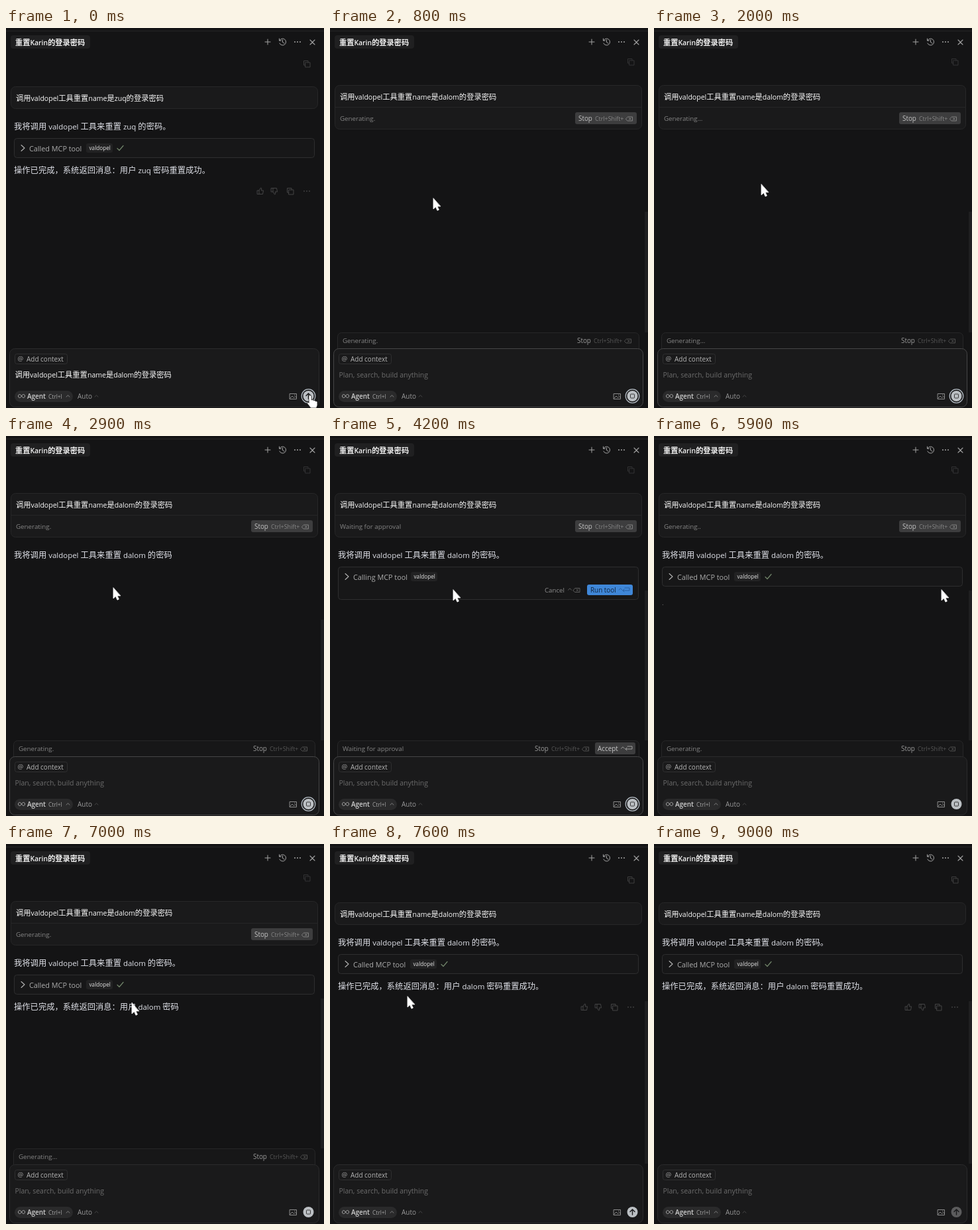
Write an HTML page with a canvas that moves like this. It is 480 by 573 pixels and loops after 9400 ms.

```html
<!DOCTYPE html>
<html lang="zh-CN">
<head>
<meta charset="utf-8">
<title>Agent chat</title>
<style>
html, body { margin: 0; width: 100%; height: 100%; overflow: hidden; background: #141415; }
canvas { display: block; }
</style>
</head>
<body>
<canvas id="stage" width="480" height="573"></canvas>
<script>
const ctx = document.getElementById('stage').getContext('2d');
const LOOP = 9400, SEND = 300, TOOL = 3500, RUN = 5000, DONE = 7300;
const LATIN = '"Open Sans", "Noto Sans", sans-serif';
const HAN = '"Noto Sans CJK SC", "Noto Sans CJK", sans-serif';
const TOOL_NAME = 'valdopel', OLD_USER = 'zuq', NEW_USER = 'dalom';

const command = user => `调用${TOOL_NAME}工具重置name是${user}的登录密码`;
const plan = user => `我将调用 ${TOOL_NAME} 工具来重置 ${user} 的密码。`;
const report = user => `操作已完成，系统返回消息：用户 ${user} 密码重置成功。`;

// Pointer path: time, x, y
const path = [
  [0, 457, 556], [300, 457, 556], [450, 405, 500], [700, 185, 285], [800, 156, 257],
  [1100, 156, 257], [1500, 158, 248], [1900, 162, 236], [2900, 162, 229], [3500, 164, 230],
  [4200, 186, 232], [4700, 405, 230], [5000, 425, 231], [5900, 434, 232], [6100, 420, 234],
  [7000, 190, 240], [7600, 117, 230], [8150, 120, 229], [8600, 262, 222], [9000, 225, 185]
];

function pointerAt(t) {
  const i = Math.max(1, path.findIndex(p => p[0] > t));
  const [t0, x0, y0] = path[i - 1], [t1, x1, y1] = path[i];
  let k = (t - t0) / (t1 - t0);
  k = k * k * (3 - 2 * k);
  return [x0 + (x1 - x0) * k, y0 + (y1 - y0) * k];
}

// Han and Latin runs share one nominal size; y is the middle of the line
function text(str, x, y, size, color, weight = 400) {
  ctx.fillStyle = color;
  for (const run of str.match(/[\u3000-\uffef]+|[^\u3000-\uffef]+/g) || []) {
    const han = run.charCodeAt(0) >= 0x3000;
    ctx.font = `${weight} ${han ? size : size * 0.933}px ${han ? HAN : LATIN}`;
    ctx.fillText(run, x, y + size * 0.36);
    x += ctx.measureText(run).width;
  }
}

function box(x, y, w, h, r, fill, stroke) {
  ctx.beginPath();
  ctx.roundRect(x, y, w, h, r);
  if (fill) { ctx.fillStyle = fill; ctx.fill(); }
  if (stroke) { ctx.strokeStyle = stroke; ctx.lineWidth = 1; ctx.stroke(); }
}

function disc(x, y, r, fill) {
  ctx.beginPath();
  ctx.arc(x, y, r, 0, 7);
  ctx.fillStyle = fill;
  ctx.fill();
}

// Strokes (and optionally fills) SVG path data placed at x, y
function icon(d, x, y, color, width = 1, fill) {
  const shape = new Path2D(d);
  ctx.save();
  ctx.translate(x, y);
  if (fill) { ctx.fillStyle = fill; ctx.fill(shape); }
  ctx.strokeStyle = color;
  ctx.lineWidth = width;
  ctx.lineJoin = ctx.lineCap = 'round';
  ctx.stroke(shape);
  ctx.restore();
}

const ICON = {
  plus: 'M-4 0H4M0-4V4',
  cross: 'M-3.5-3.5L3.5 3.5M3.5-3.5L-3.5 3.5',
  history: 'M-4.6-2A5 5 0 1 1-4.6 2M-5-5V-2H-2M0-3V.5L2.5 2',
  copy: 'M-2-2H5V5H-2ZM-2 2H-4.5V-4.5H2V-2',
  thumb: 'M-4.5-1H-2V4.5H-4.5ZM-2-1L.5-5Q2-5 1.7-3L1.3-1H4.5L3.5 4.5H-2',
  chevron: 'M-2.5-4.5L2.5 0L-2.5 4.5',
  check: 'M-4.5 .5L-1.5 3.5L4.5-3.5',
  up: 'M-2.5 1.2L0-1.2L2.5 1.2',
  erase: 'M-5 0L-2-3H5V3H-2ZM0-1.3L2.6 1.3M2.6-1.3L0 1.3',
  enter: 'M-2-3H5V1H-5M-3-1L-5 1L-3 3',
  infinity: 'M0 0C-1.5-3.5-5-3-5 0S-1.5 3.5 0 0S5-3 5 0S1.5 3.5 0 0',
  image: 'M-5-4H5V4H-5ZM-5 3L-1.5-.5L1 2L3 0L5 2M2-2H2.5',
  arrow: 'M0 4V-4M-3.5-.6L0-4L3.5-.6',
  pointer: 'M0 0V16L3.6 12.8L6 18.2L8.4 17.1L6 11.9H10.6Z',
  hand: 'M0 0C0-3 4-3 4 0V5C5 4 7 4 7.3 6C8.5 5 10 5.5 10.3 7C11.5 6.2 13 7 13 8.5V13L11.5 17H3L-2 10.5C-3 8.5-1 7.5 0 9Z'
};

function dots(x, y, color) {
  for (const dx of [-4, 0, 4]) disc(x + dx, y, 0.9, color);
}

function header(shift) {
  ctx.fillStyle = '#252526';
  ctx.fillRect(0, 4, 480, 1);
  box(7, 11, 120, 20, 4, '#202021');
  text('重置Karin的登录密码', 14, 21.5, 11.2, '#f2f2f2', 600);
  icon(ICON.plus, 395, 21, '#a4a4a4');
  icon(ICON.history, 417.5, 21, '#a4a4a4');
  dots(440, 21, '#b0b0b0');
  icon(ICON.cross, 462.5, 21.5, '#a4a4a4', 1.1);
  icon(ICON.copy, 454, 54 - shift, shift ? '#333334' : '#3e3e3f');
}

function stopKeys(x, y, color, keyColor) {
  text('Stop', x, y, 10.6, color);
  text('Ctrl+Shift+', x + 25, y, 9.5, keyColor);
  icon(ICON.erase, x + 76.5, y + 0.5, keyColor, 0.9);
}

function prompt(user, running, status) {
  box(7.5, running ? 86.5 : 88.5, 463, running ? 66 : 33, 7, '#1a1a1b', '#272728');
  text(command(user), 15, running ? 103.5 : 105.5, 11.3, '#fafafa', 500);
  if (!running) return;
  ctx.fillStyle = '#262627';
  ctx.fillRect(8, 119, 462, 1);
  text(status, 15, 136.5, 10.5, '#858585');
  box(370, 127, 93, 18, 3, '#3d3d3e');
  stopKeys(375, 136.5, '#c4c4c4', '#868686');
}

function toolCard(y, calling, hover) {
  box(12.5, y + 0.5, 453, calling ? 49 : 29, 4, '#171718', '#2e2e2f');
  icon(ICON.chevron, 25.5, y + 15, hover ? '#e0e0e0' : '#b4b4b4', 1.1);
  text(calling ? 'Calling MCP tool' : 'Called MCP tool', 35, y + 15.5, 11.6, '#acacac');
  const x = calling ? 122 : 121;
  box(x, y + 8, 40, 14, 3, '#222223');
  text(TOOL_NAME, x + 4.5, y + 15, 8.8, '#e0e0e0', 500);
  if (!calling) {
    icon(ICON.check, 172.5, y + 15, '#71856a', 1.2);
    return;
  }
  text('Cancel', 324, y + 35.5, 10.4, '#8e8e8e');
  icon(ICON.up, 362, y + 34, '#646464', 0.9);
  icon(ICON.erase, 372, y + 35.5, '#646464', 0.9);
  box(388, y + 27, 69, 16, 3, '#3f87d8');
  text('Run tool', 393, y + 35.5, 10.6, '#10243e');
  icon(ICON.up, 438.5, y + 34, '#245a9b', 0.9);
  icon(ICON.enter, 447, y + 35, '#245a9b', 0.9);
}

function feedback() {
  const color = '#444445';
  icon(ICON.thumb, 384, 246, color);
  ctx.save();
  ctx.translate(405, 246);
  ctx.scale(1, -1);
  icon(ICON.thumb, 0, 0, color);
  ctx.restore();
  icon(ICON.copy, 429, 246, color);
  dots(454, 246, color);
}

function statusBar(status, waiting) {
  box(11.5, 459.5, 455, 30, 6, '#171718', '#272728');
  text(status, 19, 471.5, 10.5, '#858585');
  stopKeys(waiting ? 309 : 373, 471.5, '#9a9a9a', '#565656');
  if (!waiting) return;
  box(400, 462, 61, 18, 3, '#3d3d3e');
  text('Accept', 404, 471.5, 10.6, '#c8c8c8');
  icon(ICON.up, 442, 470, '#a8a8a8', 0.9);
  icon(ICON.enter, 451, 471, '#a8a8a8', 0.9);
}

function composer(t, running) {
  const focused = t >= SEND && t < RUN;
  box(5.5, 483.5, 467, 88, 8, '#1a1a1b', focused ? '#464647' : '#2b2b2c');
  box(13.5, 491.5, 79, 15, 3, null, '#2f2f30');
  text('@', 17.5, 498.5, 10.4, '#a4a4a4');
  text('Add context', 31, 499.5, 10.7, '#b4b4b4');
  if (t < SEND) text(command(NEW_USER), 13.5, 522.5, 11.3, '#fafafa', 500);
  else text('Plan, search, build anything', 13.5, 522.5, 11.3, '#6c6c6c');
  if (focused && t % 1000 >= 300 && t % 1000 < 800) {
    ctx.fillStyle = '#c8c8c8';
    ctx.fillRect(13, 516, 1, 13);
  }
  box(13, 547, 88, 17, 8.5, '#2a2a2b');
  icon(ICON.infinity, 23.5, 555, '#a8a8a8');
  text('Agent', 32, 555.5, 10.6, '#d0d0d0', 600);
  text('Ctrl+I', 64, 556, 9, '#a4a4a4');
  icon(ICON.up, 93.5, 555, '#8c8c8c', 0.9);
  text('Auto', 108, 555.5, 10.7, '#989898');
  icon(ICON.up, 136.5, 555, '#4c4c4c', 0.9);
  icon(ICON.image, 433.5, 555.5, '#8c8c8c', 1);

  const idle = t >= 8000;
  if (t < RUN + 200) {
    ctx.beginPath();
    ctx.arc(456.5, 555, 10.3, 0, 7);
    ctx.strokeStyle = '#b4bcc4';
    ctx.lineWidth = 1.2;
    ctx.stroke();
  }
  disc(456.5, 555, 8, idle ? '#5c5c5d' : '#bcc0c4');
  if (running) box(453.5, 552, 6, 6, 1, null, '#3a3a3b');
  else icon(ICON.arrow, 456.5, 555, '#1a1a1b', 1.4);
}

function draw(t) {
  const running = t >= SEND && t < DONE;
  const waiting = t >= TOOL && t < RUN;
  const user = t < SEND ? OLD_USER : NEW_USER;
  const down = running ? 31 : 0;
  const [px, py] = pointerAt(t);
  const dotted = time => '.'.repeat(1 + Math.floor(time / 230) % 3);
  const status = time => waiting ? 'Waiting for approval' : 'Generating' + dotted(time);

  ctx.fillStyle = '#141415';
  ctx.fillRect(0, 0, 480, 573);
  header(running ? 3 : 0);
  prompt(user, running, status(t));

  let line = plan(user), result = report(user);
  if (running) {
    const typed = Math.min(line.length - 1, Math.max(0, Math.floor((t - 2200) / 600 * line.length)));
    if (t < 3200) line = line.slice(0, typed);
    result = result.slice(0, Math.max(0, Math.floor((t - 6500) / 600 * result.length)));
  }
  text(line, 12, 149 + down, 12.3, '#dfe1e8');
  if (!running || t >= TOOL) {
    const hover = t >= 8200 && t < 9000 && py < 196;
    toolCard(running ? 197 : 166, waiting, hover);
  }
  if (!running || t >= 6500) text(result, 12, 215 + down, 12.3, '#dfe1e8');
  else if (t >= RUN + 200) text(dotted(t % 5000), 12, 251.5, 10.5, '#757575');
  if (!running) feedback();

  if (t >= SEND) {
    const top = t < TOOL ? 277 : running ? 233 : 237;
    ctx.fillStyle = '#1f1f20';
    ctx.fillRect(475, top, 5, (running ? 459 : 482) - top);
  }
  if (running) statusBar(status(t % 5000), waiting);
  composer(t, running);

  if (t < 9000) {
    const onRun = waiting && px > 388 && px < 457 && py > 224 && py < 241;
    if (t < SEND || onRun) icon(ICON.hand, px, py, '#202020', 0.8, '#fff');
    else icon(ICON.pointer, px, py, '#fff', 0.8, '#fff');
  }
}

function tick(now) {
  draw(now % LOOP);
  requestAnimationFrame(tick);
}
requestAnimationFrame(tick);
</script>
</body>
</html>
```
